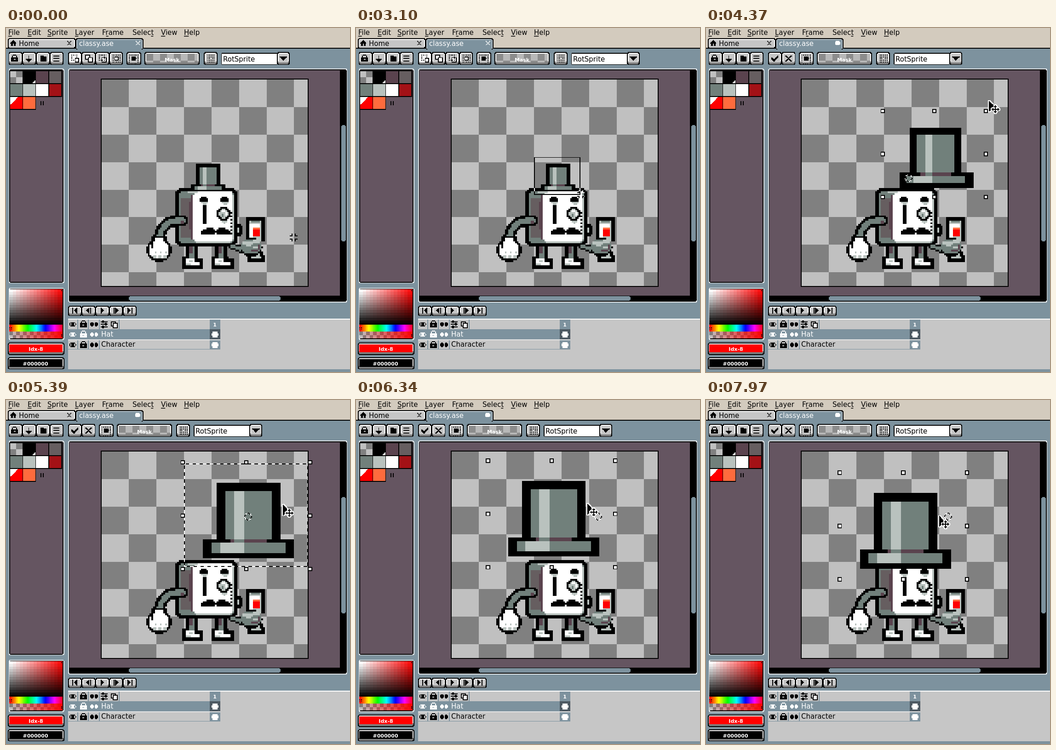
Animation of 748x748 px, one loop 8000 ms. Source, as an HTML page with a canvas:

```html
<!DOCTYPE html>
<html>
<head>
<meta charset="utf-8">
<style>
html, body { margin: 0; width: 100%; height: 100%; overflow: hidden; background: #7d929e; }
canvas { display: block; width: 748px; height: 748px; }
</style>
</head>
<body>
<canvas id="stage" width="748" height="748"></canvas>
<script>
const LOOP = 8000, UNIT = 1.87;      // stage pixels per interface pixel
const OX = 111, OY = 60;             // sprite origin in interface pixels, zoom 2
const K = '#000', W = '#fff', FACE = '#c6c6c6', BLUE = '#7d929e', PLUM = '#655561';
const GRAY = '#71807b', LIGHT = '#b9c2be', DARK = '#665e60', WINE = '#5a434e';

function layer(w, h) {
  const c = document.createElement('canvas');
  c.width = w; c.height = h;
  const g = c.getContext('2d', { willReadFrequently: true });
  g.imageSmoothingEnabled = false;
  return g;
}
const box = (g, color, ...rects) => {
  g.fillStyle = color;
  for (const r of rects) g.fillRect(...r);
};
const rounded = (g, color, x, y, w, h) =>
  box(g, color, [x + 1, y, w - 2, h], [x, y + 1, w, h - 2]);
function disc(g, color, cx, cy, rx, ry = rx) {
  for (let y = Math.floor(cy - ry); y < cy + ry; y++) {
    const q = 1 - ((y + .5 - cy) / ry) ** 2;
    if (q <= 0) continue;
    const half = rx * Math.sqrt(q), x = Math.round(cx - half);
    box(g, color, [x, y, Math.round(cx + half) - x, 1]);
  }
}
// Pixel triangle growing thinner along dir
function triangle(g, color, x, y, dir, n, vertical) {
  for (let i = 0; i < n; i++) {
    const r = n - 1 - i, d = dir * i;
    box(g, color, vertical ? [x - r, y + d, 2 * r + 1, 1] : [x + d, y - r, 1, 2 * r + 1]);
  }
}
function cross(g, color, x, y, n) {
  for (let i = -n; i <= n; i++) box(g, color, [x + i, y + i, 1, 1], [x + i, y - i, 1, 1]);
}
function checker(g, x, y, w, h, size, a = '#808080', b = '#c0c0c0') {
  for (let j = 0; j < h; j += size) for (let i = 0; i < w; i += size)
    box(g, (i + j) / size % 2 ? b : a, [x + i, y + j, Math.min(size, w - i), Math.min(size, h - j)]);
}

// ---------- interface ----------
function button(g, x, y, w, h, face = FACE) {
  rounded(g, K, x, y, w, h);
  rounded(g, '#7f7f7f', x + 1, y + 1, w - 2, h - 2);
  rounded(g, W, x + 1, y + 1, w - 2, h - 4);
  box(g, face, [x + 2, y + 2, w - 4, h - 5]);
}
function panel(g, x, y, w, h) {
  rounded(g, '#dfe4e7', x, y, w, h);
  rounded(g, K, x + 1, y + 1, w - 2, h - 2);
  box(g, PLUM, [x + 2, y + 2, w - 4, h - 4]);
}
function lock(g, x, y, color = K, hole = FACE) {
  box(g, color, [x + 1, y, 4, 1], [x, y + 1, 1, 2], [x + 5, y + 1, 1, 2], [x - 1, y + 3, 8, 5]);
  box(g, hole, [x + 2, y + 5, 2, 1]);
}
function dotted(g, x, y, n) {
  for (let i = 0; i <= n; i += 2)
    box(g, K, [x + i, y, 1, 1], [x + i, y + n, 1, 1], [x, y + i, 1, 1], [x + n, y + i, 1, 1]);
}
function hollow(g, x, y, n) {
  box(g, K, [x, y, n, n]);
  box(g, W, [x + 1, y + 1, n - 2, n - 2]);
}

function drawPalette(g) {
  panel(g, 3, 47, 65, 250);
  const swatches = ['', K, WINE, DARK, GRAY, LIGHT, W, '#a31116', '#f00', '#ff6b3d'];
  swatches.forEach((color, i) => {
    const x = 5 + i % 4 * 15, y = 50 + Math.floor(i / 4) * 15;
    box(g, K, [x - 1, y - 1, 16, 16]);
    color ? box(g, color, [x, y, 14, 14]) : checker(g, x, y, 14, 14, 7, '#c0c0c0', '#808080');
  });
  for (let i = 0; i < 9; i++) box(g, W, [5, 80 + i, 9 - i, 1]);
  for (let i = 0; i < 3; i++) box(g, W, [33 - i, 61 + i, 1 + i, 1]);
  box(g, K, [40, 85, 1, 5], [43, 85, 1, 5]);
}

function drawSpectrum(g) {
  panel(g, 3, 302, 65, 61);
  for (let j = 0; j < 14; j++) for (let i = 0; i < 16; i++) {
    const v = 255 * (1 - j / 13), s = v * (1 - i / 15);
    box(g, `rgb(${v},${s},${s})`, [4 + i * 4, 304 + j * 3, i < 15 ? 4 : 2, 3]);
  }
  for (let i = 0; i < 62; i++) box(g, `hsl(${i * 5.8},100%,50%)`, [4 + i, 345, 1, 8]);
  checker(g, 4, 353, 62, 8, 4);
  for (let i = 0; i < 62; i++) box(g, `rgba(255,0,0,${i / 62})`, [4 + i, 353, 1, 8]);
  dotted(g, 64, 303, 2); dotted(g, 4, 348, 2); dotted(g, 64, 356, 2);
  button(g, 2, 366, 66, 14, '#f00');
  button(g, 2, 383, 66, 14, K);
}

function drawToolbar(g, transforming) {
  for (let i = 0; i < 4; i++) button(g, 3 + 16 * i, 28, 16, 15);
  lock(g, 7, 31);
  box(g, K, [26, 32, 1, 7]); triangle(g, K, 26, 36, 1, 4, true);
  box(g, K, [40, 32, 4, 7], [40, 33, 7, 6]);
  for (let i = 0; i < 3; i++) box(g, K, [55, 32 + 3 * i, 7, 1]);

  const count = transforming ? 2 : 4, shift = transforming ? -32 : 0;
  for (let i = 0; i < count; i++) button(g, 72 + 16 * i, 28, 16, 15, i || transforming ? FACE : W);
  if (transforming) {
    for (let i = 0; i < 8; i++) box(g, K, [76 + i, i < 3 ? 34 + i : 39 - i, 1, 3]);
    cross(g, K, 95, 35, 3); cross(g, K, 96, 35, 3);
  } else {
    dotted(g, 76, 31, 6); hollow(g, 80, 35, 5);
    hollow(g, 92, 31, 6); hollow(g, 95, 34, 6);
    hollow(g, 111, 34, 6); dotted(g, 108, 31, 6);
    dotted(g, 124, 31, 8); hollow(g, 126, 33, 5);
  }
  button(g, 140 + shift, 28, 17, 15);
  dotted(g, 143 + shift, 31, 10); disc(g, K, 148.5 + shift, 35.5, 3);
  button(g, 161 + shift, 28, 64, 15);
  checker(g, 163 + shift, 30, 60, 10, 8, '#8c8c8c', '#b8b8b8');
  button(g, 230 + shift, 28, 16, 15);
  dotted(g, 234 + shift, 31, 8); dotted(g, 236 + shift, 33, 4);
  rounded(g, K, 250 + shift, 29, 66, 14);
  box(g, W, [251 + shift, 30, 64, 12]);
  button(g, 315 + shift, 28, 15, 15);
  triangle(g, K, 322 + shift, 33, 1, 5, true);
}

function drawTimeline(g) {
  for (let i = 0; i < 5; i++) button(g, 72 + 16 * i, 323, 16, 12);
  const play = (x, dir) => triangle(g, K, x, 328, dir, 4);
  play(82, -1); box(g, K, [77, 325, 1, 7]);
  play(96, -1); box(g, K, [98, 325, 1, 7]);
  play(110, 1);
  box(g, K, [125, 325, 1, 7]); play(127, 1);
  play(141, 1); box(g, K, [146, 325, 1, 7]);

  box(g, FACE, [72, 338, 328, 59]);
  box(g, W, [72, 338, 328, 1]);
  box(g, BLUE, [237, 339, 12, 11], [72, 350, 177, 1], [72, 351, 177, 11], [72, 373, 177, 1],
    [237, 362, 12, 12], [131, 339, 1, 11], [248, 339, 1, 35]);
  box(g, '#e6e6e6', [72, 362, 177, 1]);
  box(g, '#4d5962', [237, 350, 12, 12]);
  disc(g, W, 243, 356.5, 4); disc(g, W, 243, 368.5, 4);
  for (let row = 0; row < 3; row++) {
    const y = 344.5 + 12 * row, ink = row === 1 ? W : K, bg = row === 1 ? BLUE : FACE;
    disc(g, ink, 77.5, y, 4, 3); disc(g, bg, 77.5, y, 3, 2); disc(g, ink, 77.5, y, 1.5);
    lock(g, 87, y - 4.5, ink, bg);
    disc(g, ink, 100, y, 2.3); disc(g, ink, 105, y, 2.3);
    box(g, BLUE, [83, 339 + 12 * row, 1, 11], [95, 339 + 12 * row, 1, 11], [108, 339 + 12 * row, 1, 11]);
  }
  for (let i = 0; i < 3; i++) box(g, K, [110, 341 + 3 * i, 8, 1], [112 + i % 2 * 3, 340 + 3 * i, 2, 3]);
  hollow(g, 122, 341, 6); hollow(g, 124, 343, 6);
}

function drawInterface(transforming) {
  const g = layer(400, 400);
  box(g, BLUE, [0, 0, 400, 400]);
  box(g, '#d3cbbe', [0, 0, 400, 23]);
  box(g, K, [0, 23, 400, 1]);
  rounded(g, K, 2, 12, 79, 13); rounded(g, W, 3, 13, 77, 10); box(g, FACE, [4, 14, 75, 9]);
  rounded(g, K, 81, 12, 79, 13); rounded(g, '#b4c3cc', 82, 13, 77, 12);
  box(g, BLUE, [83, 14, 75, 12], [0, 24, 81, 2]);
  triangle(g, K, 8, 17, -1, 4, true); box(g, K, [6, 17, 2, 4], [9, 17, 2, 4]);
  cross(g, K, 73, 17, 2);
  transforming ? disc(g, W, 153, 17.5, 3) : cross(g, W, 153, 17, 2);

  drawToolbar(g, transforming);
  drawPalette(g);
  drawSpectrum(g);
  panel(g, 72, 47, 325, 272);
  box(g, K, [388, 49, 7, 269], [74, 311, 321, 7]);
  rounded(g, BLUE, 390, 113, 5, 135);
  rounded(g, BLUE, 143, 312, 176, 5);
  box(g, K, [OX - 1, OY - 1, 242, 242]);
  checker(g, OX, OY, 240, 240, 32);
  drawTimeline(g);
  return g.canvas;
}

// ---------- sprite layers ----------
function drawHat() {
  const g = layer(27, 22);
  box(g, K, [7, 4, 14, 13], [4, 16, 20, 4]);
  box(g, GRAY, [9, 6, 10, 10], [6, 17, 16, 2]);
  box(g, LIGHT, [11, 6, 2, 10], [8, 17, 5, 2]);
  box(g, GRAY, [11, 16, 2, 1]);
  box(g, WINE, [10, 16, 1, 1], [13, 16, 5, 1]);
  return g.canvas;
}

function limb(g, points, outer, inner) {
  for (const [color, r] of [[K, outer], [GRAY, inner]])
    for (let t = 0; t <= 1; t += .04) {
      const [x, y] = [0, 1].map(i =>
        (1 - t) ** 2 * points[0][i] + 2 * t * (1 - t) * points[1][i] + t * t * points[2][i]);
      disc(g, color, x, y, r);
    }
}

function drawCharacter() {
  const g = layer(120, 120);
  // legs and shoes
  for (const [leg, shoe, width] of [[49, 47, 12], [66, 64, 13]]) {
    box(g, K, [leg, 96, 7, 9], [shoe, 103, width, 7]);
    box(g, GRAY, [leg + 2, 96, 3, 8]);
    box(g, WINE, [leg + 2, 97, 2, 4]);
    box(g, W, [shoe + 2, 104, 5, 4], [shoe + 2, 106, width - 4, 2]);
    box(g, LIGHT, [shoe + 2, 107, 3, 1], [shoe + 4, 105, 2, 1]);
    g.clearRect(shoe + width - 3, 103, 3, 1);
  }
  // head
  box(g, K, [45, 63, 32, 34], [44, 64, 34, 32], [43, 65, 36, 30]);
  box(g, GRAY, [46, 65, 30, 30], [45, 66, 32, 28]);
  box(g, DARK, [46, 69, 6, 23]);
  box(g, WINE, [52, 67, 1, 26], [51, 71, 1, 16]);
  box(g, W, [54, 65, 22, 29], [53, 67, 24, 26]);
  box(g, LIGHT, [76, 67, 1, 26], [55, 94, 20, 1], [50, 65, 6, 1]);
  // eyebrows, eye, moustache
  for (const x of [57, 69]) {
    box(g, K, [x + 1, 68, 3, 1], [x, 69, 5, 2]);
    box(g, LIGHT, [x + 1, 71, 4, 1], [x + 2, 72, 2, 1]);
  }
  box(g, K, [59, 73, 2, 11]);
  box(g, K, [59, 87, 1, 2], [58, 88, 8, 2], [60, 87, 6, 2], [61, 86, 4, 1],
    [67, 88, 8, 2], [67, 87, 6, 2], [68, 86, 4, 1], [73, 87, 1, 2], [65, 88, 3, 1]);
  // monocle and chain
  disc(g, K, 71, 78, 4); disc(g, LIGHT, 71, 78, 2.7);
  box(g, W, [70, 76, 2, 1], [72, 77, 1, 2]);
  box(g, GRAY, [70, 78, 1, 2]);
  box(g, LIGHT, [70, 82, 3, 1], [71, 83, 1, 1]);
  for (let y = 77; y < 90; y += 2) box(g, K, [75, y, 1, 1]);
  // ear
  box(g, K, [79, 84, 2, 7], [79, 85, 3, 5]);
  box(g, LIGHT, [79, 86, 1, 3]);
  // left arm and glove
  limb(g, [[47, 82], [36, 81], [33.5, 92]], 3.3, 1.6);
  box(g, WINE, [46, 82, 2, 2]);
  box(g, K, [29, 91, 9, 4]);
  disc(g, K, 33.5, 99, 7.4, 7);
  disc(g, W, 33.5, 99, 5.7, 5.3);
  box(g, W, [31, 92, 5, 4]);
  box(g, K, [29, 95, 1, 3]);
  for (let x = 30; x < 38; x += 3) box(g, LIGHT, [x, 102, 2, 2], [x + 1, 100, 1, 1]);
  // glass, right arm and hand
  box(g, K, [84, 80, 11, 14], [86, 100, 8, 3], [85, 102, 10, 4]);
  box(g, LIGHT, [86, 82, 7, 12], [88, 99, 4, 4], [87, 103, 6, 1]);
  box(g, W, [86, 84, 2, 9], [88, 84, 4, 2]);
  box(g, GRAY, [87, 82, 5, 1]);
  box(g, '#f00', [88, 86, 4, 5]);
  box(g, '#ff6b3d', [88, 86, 4, 1]);
  limb(g, [[76, 97], [80, 98], [84, 100]], 2, 1);
  disc(g, K, 87, 97.5, 6.5, 5.5);
  disc(g, GRAY, 87, 97, 6, 4.4);
  box(g, LIGHT, [82, 94, 6, 2], [84, 96, 3, 1], [88, 93, 4, 2], [88, 97, 3, 1]);
  box(g, WINE, [87, 99, 4, 1], [91, 96, 1, 3]);
  return g.canvas;
}

// ---------- motion ----------
function track(keys, t) {
  let i = 0;
  while (i < keys.length - 2 && t >= keys[i + 1][0]) i++;
  const [a, b] = [keys[i], keys[i + 1]];
  const p = Math.min(1, Math.max(0, (t - a[0]) / (b[0] - a[0])));
  return a.slice(1).map((v, n) => v + (b[n + 1] - v) * p);
}
const PRESS = 2360, RELEASE = 3220, GRAB = 3700, DROP = 4800, MOVE = 5450;
const pointerKeys = [[0, 625, 454], [980, 625, 454], [1240, 480, 350], [1480, 386, 283], [2100, 386, 283],
  [2110, 388, 283], [2510, 388, 283], [2900, 505, 380], [3080, 488, 361], [RELEASE, 488, 361],
  [3600, 499, 256], [DROP, 667, 114], [4970, 655, 99], [5370, 602, 229], [MOVE, 602, 229]];
const sizeKeys = [[GRAB, 27, 22], [4110, 51, 42], [4170, 51, 42], [4370, 58, 48], [4400, 58, 48], [4750, 72, 60]];
const moveKeys = [[MOVE, 48, 7], [5790, 37, 4], [6320, 22, 6], [6410, 22, 6], [6600, 21, 8],
  [7220, 23, 12], [7920, 23, 12], [7970, 23, 13]];
const stageX = sx => (OX + 2 * sx) * UNIT, stageY = sy => (OY + 2 * sy) * UNIT;

function poseAt(t) {
  let [px, py] = track(pointerKeys, t), [w, h] = track(sizeKeys, t).map(Math.round);
  let x = 48, y = 67 - h;
  if (t < RELEASE) {
    y = 45;
    w = Math.max(1, Math.ceil((px - stageX(0)) / 3.74) - x);
    h = Math.max(1, Math.ceil((py - stageY(0)) / 3.74) - y);
  } else if (t >= GRAB && t < DROP) {
    px = stageX(x + w) + 11; py = stageY(y) - 24;
  } else if (t >= MOVE) {
    [x, y] = track(moveKeys, t).map(Math.round);
    px = stageX(x) + 214; py = stageY(y) + 91;
  }
  return { px: Math.round(px / UNIT), py: Math.round(py / UNIT), x, y, w, h };
}

// ---------- per-frame drawing ----------
const plainUI = drawInterface(false), transformUI = drawInterface(true);
const hat = drawHat(), character = drawCharacter();
const low = layer(400, 400), sprite = layer(120, 120);
const ctx = document.getElementById('stage').getContext('2d');

function contrast(x, y) {
  box(low, low.getImageData(x, y, 1, 1).data[1] < 100 ? W : K, [x, y, 1, 1]);
}
function outline(x, y, w, h, plot) {
  for (let i = 0; i < w; i++) { plot(x + i, y); if (h > 1) plot(x + i, y + h - 1); }
  for (let i = 1; i < h - 1; i++) { plot(x, y + i); plot(x + w - 1, y + i); }
}
function crosshair(x, y) {
  for (const a of [-1, 1]) for (const b of [-1, 1])
    for (const [i, j] of [[2, 2], [2, 3], [2, 4], [3, 2], [4, 2]]) contrast(x + a * i, y + b * j);
}
function moveArrow(x, y) {
  const shape = (color, d) => {
    const b = (i, j, w, h) => box(low, color, [x + i - d, y + j - d, w + 2 * d, h + 2 * d]);
    for (let i = 0; i < 8; i++) b(0, i, i + 1, 1);
    for (let i = 0; i < 4; i++) b(0, 8 + i, 4 - i, 1);
  };
  const icon = (color, d) => {
    const b = (i, j, w, h) => box(low, color, [x + 7 + i - d, y + 9 + j - d, w + 2 * d, h + 2 * d]);
    b(-4, 0, 9, 1); b(0, -4, 1, 9);
    b(-3, -1, 1, 3); b(3, -1, 1, 3); b(-1, -3, 3, 1); b(-1, 3, 3, 1);
  };
  shape(W, 1); shape(K, 0);
  icon(W, 1); icon(K, 0);
}
function pivot(x, y) {
  for (let i = 0; i < 24; i++) {
    const a = i * Math.PI / 12;
    box(low, i % 6 < 3 ? K : W, [Math.round(x + 4 * Math.cos(a)), Math.round(y + 4 * Math.sin(a)), 1, 1]);
  }
}

const menus = [['File', 5, 0], ['Edit', 47, 0], ['Sprite', 90, 0], ['Layer', 150, 0],
  ['Frame', 209, 1], ['Select', 275, 5], ['View', 337, 0], ['Help', 387, 0]];
function label(s, x, y, color = K, font = '15px', align = 'left') {
  ctx.font = font + ' "DejaVu Sans", sans-serif';
  ctx.textAlign = align;
  ctx.fillStyle = color;
  ctx.fillText(s, x, y);
}
function drawLabels(shift) {
  for (const [name, x, n] of menus) {
    label(name, x, 15);
    const start = ctx.measureText(name.slice(0, n)).width;
    ctx.fillRect(x + start, 17, ctx.measureText(name[n]).width - 1, 1.5);
  }
  const small = 'bold 11px';
  label('Home', 28, 39);
  label('classy.ase', 159, 39, W);
  label('Mask', 361 + shift, 73, W, small, 'center');
  label('RotSprite', 472 + shift, 73);
  label('Idx-8', 65, 702, W, small, 'center');
  label('#000000', 64, 734, W, small, 'center');
  label('1', 454, 649, W, small, 'center');
  label('Hat', 207, 671, W);
  label('Character', 207, 693);
}

function render(t) {
  const pose = poseAt(t), { x, y, w, h } = pose, transforming = t >= GRAB;
  low.drawImage(transforming ? transformUI : plainUI, 0, 0);

  sprite.clearRect(0, 0, 120, 120);
  sprite.drawImage(character, 0, 0);
  transforming ? sprite.drawImage(hat, x, y, w, h) : sprite.drawImage(hat, 48, 45);
  low.drawImage(sprite.canvas, OX, OY, 240, 240);

  const sel = [OX + 2 * x, OY + 2 * y, 2 * w, 2 * h];
  if (t >= PRESS && t < RELEASE) outline(...sel, contrast);
  const idle = t >= RELEASE && t < GRAB || t >= DROP && t < MOVE;
  if (idle) {
    const phase = Math.floor(t / 100);
    outline(...sel, (i, j) => box(low, (i + j + phase) % 8 < 4 ? K : W, [i, j, 1, 1]));
  }
  if (t >= RELEASE) {
    for (let j = 0; j < 3; j++) for (let i = 0; i < 3; i++) {
      if (i === 1 && j === 1) continue;
      hollow(low, sel[0] + i * w + 2 * i - 4, sel[1] + j * h + 2 * j - 4, 5);
    }
    t < DROP ? pivot(235, 174) : pivot(281, 135);
  }
  t < 3450 ? crosshair(pose.px, pose.py) : moveArrow(pose.px, pose.py);

  ctx.imageSmoothingEnabled = false;
  ctx.drawImage(low.canvas, 0, 0, 748, 748);
  drawLabels(transforming ? -60 : 0);
}

const start = performance.now();
function tick() {
  render((performance.now() - start) % LOOP);
  requestAnimationFrame(tick);
}
tick();
</script>
</body>
</html>
```
